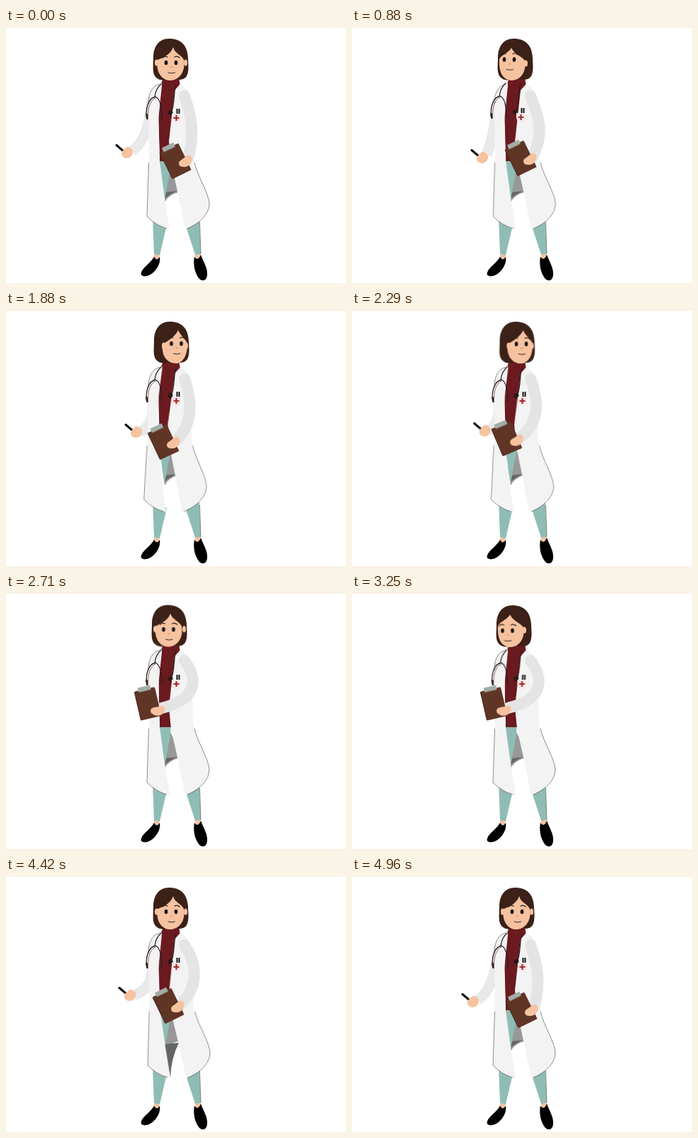
Write an HTML page that moves like this. It is 480 by 360 pixels and loops after 5 s.

```html
<!DOCTYPE html>
<html lang="en">
<head>
<meta charset="utf-8">
<title>Doctor</title>
<style>
html, body { margin: 0; width: 100%; height: 100%; overflow: hidden; background: #fff; }
svg { display: block; width: 480px; height: 360px; }
.m { animation: 5s ease-in-out infinite; }
.skin { fill: #f6c29f; }
.teal { fill: #8fbdb6; }
.coat { fill: #f3f3f3; }
.sleeve { fill: none; stroke: #e4e4e4; stroke-width: 16; }
.line { fill: none; stroke: #2a2020; stroke-width: 1.3; stroke-linecap: round; }
.edge { fill: none; stroke: #444; stroke-width: .6; }

/* head */
#head { animation-name: head; }
@keyframes head {
  0%, 100%, 87%, 97% { transform: translate(0, 0); }
  15%, 21% { transform: translate(-2px, 0); }
  34%, 43% { transform: translate(1px, 0); }
  54.2% { transform: translate(-2px, .5px); }
  65%, 76.5% { transform: translate(-4px, 1px); }
}
#face { animation-name: face; }
@keyframes face {
  0%, 87%, 100% { d: path("M236 27C238 36 248 38 251 45C254 62 244 74 232 74C220 74 211 62 214 45C222 42 233 37 236 27Z"); }
  15%, 21%, 65%, 76.5% { d: path("M227 28C232 38 242 40 246 46C249 64 238 74 228 74C216 74 209 64 210 45C211 38 223 36 227 28Z"); }
  34%, 43% { d: path("M242 27C245 34 251 38 254 44C257 62 248 74 239 74C227 74 218 64 220 47C228 42 238 36 242 27Z"); }
  54.2% { d: path("M234 27C237 36 247 38 250 45C253 62 243 74 231 74C219 74 211 62 213 45C220 41 231 37 234 27Z"); }
}
#look { animation-name: look; }
@keyframes look {
  0%, 87%, 100% { transform: translate(0, 0); }
  15%, 21% { transform: translate(-9px, -4.5px); }
  34%, 43% { transform: translate(6.5px, -3px); }
  54.2% { transform: translate(-1.5px, .5px); }
  65%, 76.5% { transform: translate(-9.5px, 1.7px); }
}
#earL { animation-name: earL; }
@keyframes earL {
  0%, 21%, 54.2%, 100% { transform: translate(0, 0); }
  34%, 43% { transform: translate(9px, 0); }
}
#earR { animation-name: earR; }
@keyframes earR {
  0%, 34%, 54.2%, 87%, 100% { transform: translate(0, 0); }
  15%, 21%, 65%, 76.5% { transform: translate(-6px, 1px); }
}

/* torso and coat */
#chest { animation-name: chest; }
@keyframes chest {
  0%, 30%, 54%, 87%, 100% { transform: translate(0, 0); }
  15%, 20% { transform: translate(-2px, -1px); }
  70%, 76% { transform: translate(-.7px, 0); }
}
#coat { transform-origin: 0 100px; animation-name: sway; }
@keyframes sway {
  0%, 16%, 53%, 78%, 100% { transform: skewX(0deg); }
  25% { transform: skewX(-1.6deg) translateX(9px); }
  36%, 40% { transform: skewX(1.5deg); }
  88.4% { transform: skewX(-.3deg); }
}
#coat { animation-name: swing; }
@keyframes swing {
  0%, 16%, 53%, 78%, 100% { transform: skewX(0deg); }
  25% { transform: skewX(1.6deg); }
  36%, 40% { transform: skewX(-1.5deg); }
  88.4% { transform: skewX(.4deg); }
}
#lining { animation-name: lining; }
@keyframes lining {
  0%, 78%, 96%, 100% { d: path("M226 232L241 230Q230 236 225 240L224 240Z"); }
  86%, 89% { d: path("M224 236L244 234Q233 256 232 284L229 270Z"); }
}

/* arms, pen and clipboard */
#armL { animation-name: armL; }
@keyframes armL {
  0%, 97%, 100% { d: path("M207 98C203 120 203 154 178 174"); }
  11.5%, 18% { d: path("M207 98C204 120 201 150 190 179"); }
  30%, 43% { d: path("M208 98C206 130 214 160 189 171"); }
  53%, 77% { d: path("M208 98C208 130 209 150 208 160"); }
  88%, 89% { d: path("M208 98C206 130 212 155 181 167"); }
}
#handL { animation-name: handL; }
@keyframes handL {
  0%, 97%, 100% { transform: translate(171px, 176px); }
  11.5%, 18% { transform: translate(184px, 183px); }
  30%, 43% { transform: translate(184px, 171px); }
  53%, 77% { transform: translate(206px, 160px); }
  88%, 89% { transform: translate(175px, 167px); }
}
#armR { animation-name: armR; }
@keyframes armR {
  0%, 97%, 100% { d: path("M252 96C262 125 267 150 257 184"); }
  11.5%, 18% { d: path("M252 96C264 125 272 150 255 181"); }
  30%, 43% { d: path("M252 96C262 125 265 158 241 182"); }
  53%, 77% { d: path("M252 94C270 118 273 148 220 161"); }
  88%, 89% { d: path("M252 96C268 120 275 152 246 180"); }
}
#handR { animation-name: handR; }
@keyframes handR {
  0%, 97%, 100% { transform: translate(253px, 188px); }
  11.5%, 18% { transform: translate(251px, 185px); }
  30%, 43% { transform: translate(236px, 186px); }
  53%, 77% { transform: translate(214px, 164px) rotate(25deg); }
  88%, 89% { transform: translate(242px, 183px); }
}
#board { animation-name: board; }
@keyframes board {
  0%, 97%, 100% { transform: translate(239px, 188px) rotate(-26deg); }
  11.5%, 18% { transform: translate(238px, 184px) rotate(-26deg); }
  30%, 43% { transform: translate(222px, 185px) rotate(-25deg); }
  53%, 77% { transform: translate(200px, 155px) rotate(-13deg); }
  88%, 89% { transform: translate(229px, 182px) rotate(-26deg); }
}
</style>
</head>
<body>
<svg viewBox="0 0 480 360">
  <!-- legs and shoes -->
  <path class="skin" d="M209 318H217L215 329H209ZM266 316H274L275 328H268Z"/>
  <path d="M209 323Q213 330 217 323C219 333 211 345 202 349C195 352 189 350 191 345C193 338 205 331 209 323Z"/>
  <path d="M266 323Q271 330 275 320C279 331 285 339 284 349C283 358 276 358 272 353C266 345 264 333 266 323Z"/>
  <path fill="#989898" d="M228 186L236 203L243 232Q230 235 224 246L220 220Z"/>
  <path id="lining" class="m" fill="#666"/>
  <path class="teal" d="M214 184H233L232 200L224 242L217 200Z"/>
  <path class="teal" d="M207 268L227 278L217 321L209 319ZM254 280L273 270L275 319L267 320Z"/>
  <path class="edge" d="M273.500 274L275 319"/>

  <!-- shirt -->
  <path fill="#6b1a1f" d="M222 70H244L246 82L238 96L234 188H217L215 110L218 82Z"/>

  <!-- arm with pen -->
  <path id="armL" class="m sleeve" style="stroke-width:15;stroke:#e9e9e9"/>
  <g id="handL" class="m">
    <path class="line" style="stroke:#111;stroke-width:3" d="M-15-10.500L-5-2"/>
    <path class="skin" d="M-8 1C-8-3-3-5-1-8Q3-9 5-6Q9-5 8 1Q6 8-1 8Q-8 7-8 1Z"/>
  </g>

  <!-- coat -->
  <g id="coat" class="m">
    <path class="coat" d="M220 78C206 80 201 92 201 108L202 180L199 266Q214 281 231 284L224 240L217 188L215 130L220 82Z"/>
    <path class="coat" d="M238 88L246 79Q258 85 262 100L264 180C268 205 286 232 287 248C287 264 270 278 253 284L243 235L233 190L230 160Z"/>
    <path class="edge" d="M217 79C206 82 201 92 201 108M201.500 190L199 266Q212 279 227 283M266 190C271 211 286 232 287 248C287 264 270 278 256 283"/>
  </g>

  <!-- stethoscope and badge -->
  <g id="chest" class="m">
    <path class="line" d="M219 79Q211 86 210 98M198.500 127C197 113 201 99 211 97C218 100 220 113 220 128M240 80C236 91 239 106 233 120"/>
    <path class="line" style="stroke:#74483a;stroke-width:.8" d="M200.500 125C200 113 204 101 211 99"/>
    <path class="line" style="stroke-width:2.500" d="M198.500 122L199.500 128"/>
    <circle cx="232" cy="119.500" r="3.500" fill="#2b1a1a"/>
    <path fill="#f8e9e9" d="M234 121H247V128Q246 133 240.500 135Q235 133 234 128Z"/>
    <path stroke="#a3282c" stroke-width="2.200" d="M236.500 127H244.500M240.500 123V131"/>
    <path stroke="#161616" stroke-width="2" d="M241.500 114V121M244.500 114V121"/>
  </g>

  <!-- arm with clipboard -->
  <path id="armR" class="m sleeve" stroke-linecap="round"/>
  <g id="board" class="m">
    <rect x="-15" y="-21" width="30" height="42" rx="1.500" fill="#5f3526"/>
    <path stroke="#48261c" d="M-14.500-20V20"/>
    <rect x="-9" y="-25" width="18" height="6.500" rx="1" fill="#a2ada7"/>
  </g>
  <path id="handR" class="m skin" d="M-9 3C-9-1-4-2 0-6Q4-10 8-7Q11-3 8 3Q4 9-3 8Q-9 8-9 3Z"/>

  <!-- head -->
  <g id="head" class="m">
    <path fill="#3b2118" d="M232 15C216 14 208 26 208 42C208 54 206 62 211 69Q217 75 225 73L240 72Q250 75 255 68C259 60 257 50 257 42C256 24 247 16 232 15Z"/>
    <ellipse id="earL" class="m skin" cx="212.500" cy="49" rx="2.500" ry="4.500"/>
    <ellipse id="earR" class="m skin" cx="253.500" cy="49" rx="2.500" ry="4.500"/>
    <path id="face" class="m skin"/>
    <g id="look" class="m">
      <ellipse cx="226" cy="49" rx="2.300" ry="3.300" fill="#111"/>
      <ellipse cx="240" cy="49" rx="2.300" ry="3.300" fill="#111"/>
      <path class="line" d="M221 42Q224 39 228 41M238 41Q242 39 245 42"/>
      <path class="line" style="stroke:#c9835f;stroke-width:1" d="M232 55Q234 57 235 54.500"/>
      <path class="line" style="stroke-width:1" d="M229 63Q234 65 238.500 63"/>
    </g>
  </g>
</svg>
</body>
</html>
```
